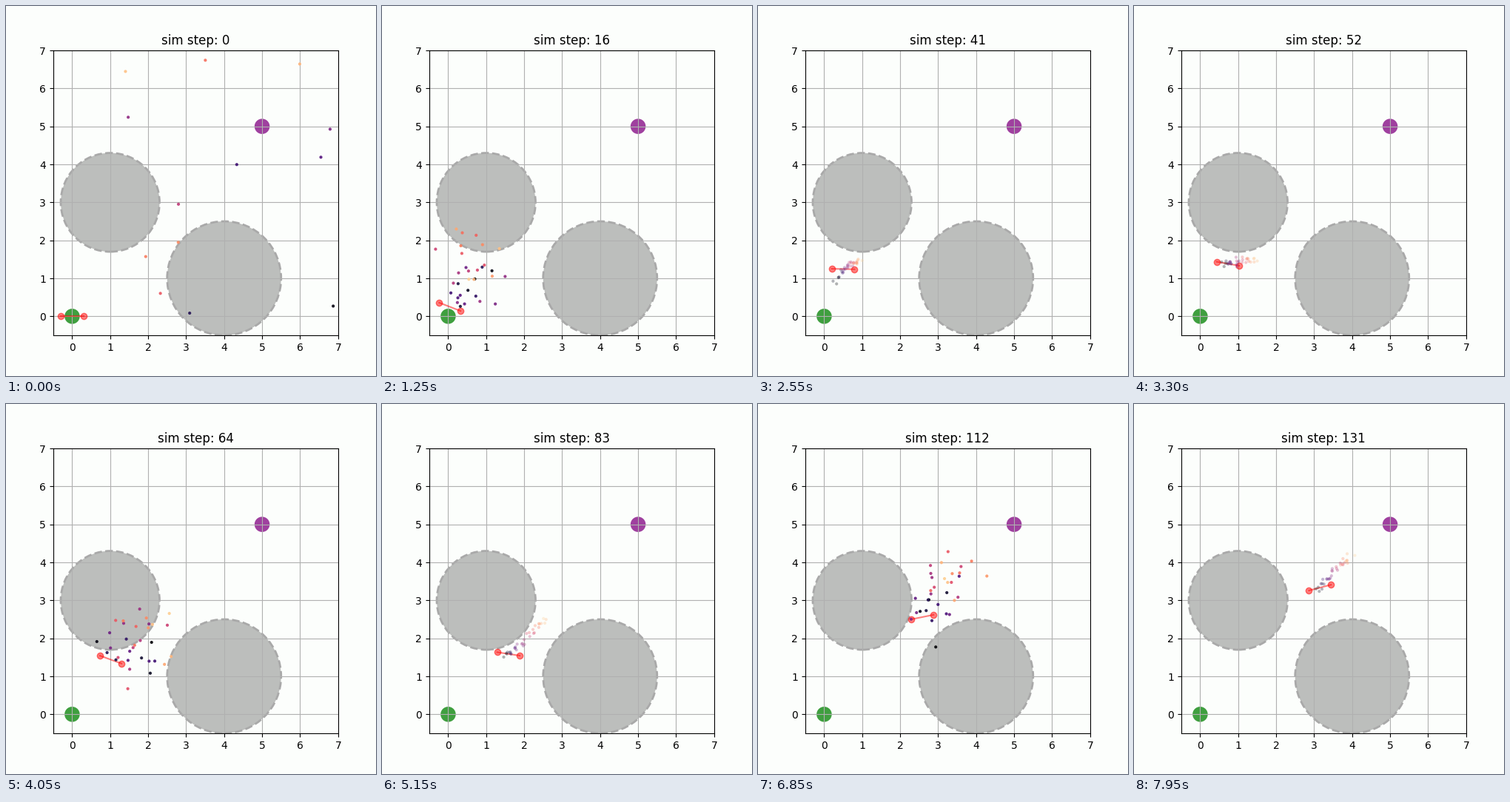
Recreate the animation shown at these times as a matplotlib script. Size 500x500 px, loop 8 s.

```python
import numpy as np
import matplotlib.pyplot as plt
from matplotlib.animation import FuncAnimation
from matplotlib.patches import Circle

FRAMES, INTERVAL = 160, 50
DENOISE, EXEC = 12, 16          # ticks spent planning / executing per cycle
HORIZON = 32
HALF = 0.3                      # half the robot's length
CENTRE, SPREAD = 3.25, 3.5      # distribution of the unplanned samples
BG = "#fcfefc"

# step, centre x, centre y, heading
KEYS = np.array([
    (0, 0, 0, 0), (16, .045, .25, -.37), (41, .5, 1.245, -.02),
    (64, 1.015, 1.44, -.35), (83, 1.585, 1.59, -.15),
    (112, 2.585, 2.56, .2), (131, 3.155, 3.335, .255), (160, 4.0, 4.2, .3),
])


def pose(step):
    """Cubic Hermite interpolation through the key poses."""
    ts, vals = KEYS[:, 0], KEYS[:, 1:]
    slopes = np.gradient(vals, ts, axis=0)
    s = np.atleast_1d(np.clip(step, ts[0], ts[-1])).astype(float)
    i = np.clip(np.searchsorted(ts, s, side="right") - 1, 0, len(ts) - 2)
    h = (ts[i + 1] - ts[i])[:, None]
    u = (s - ts[i])[:, None] / h
    return ((1 + 2 * u) * (1 - u) ** 2 * vals[i]
            + u * (1 - u) ** 2 * h * slopes[i]
            + u * u * (3 - 2 * u) * vals[i + 1]
            + u * u * (u - 1) * h * slopes[i + 1])


def samples(cycle, tick):
    """Noisy points that settle onto the path ahead while planning."""
    rng = np.random.default_rng(40 + cycle)
    plan = pose(cycle * EXEC + np.arange(HORIZON))[:, :2]
    plan = plan + rng.normal(0, .06, plan.shape)
    if tick >= DENOISE:
        return plan
    base = rng.normal(0, SPREAD, plan.shape)
    fresh = np.random.default_rng([cycle, tick]).normal(0, SPREAD, plan.shape)
    start = CENTRE + .9 * base + .4 * fresh
    return plan + (start - plan) * (1 - tick / DENOISE) ** 1.5


fig, ax = plt.subplots(figsize=(5, 5), dpi=100, facecolor=BG)
ax.set_facecolor(BG)
ax.set_aspect("equal")
ax.set_xlim(-.5, 7)
ax.set_ylim(-.5, 7)
ax.set_xticks(range(8))
ax.set_yticks(range(8))
ax.grid(True)

for centre, radius in (((1, 3), 1.3), ((4, 1), 1.5)):
    ax.add_patch(Circle(centre, radius, fc="#bcbebc", ec="#a9a9a9",
                        ls="--", lw=2))
for centre, color in (((0, 0), "green"), ((5, 5), "purple")):
    ax.add_patch(Circle(centre, .2, color=color, alpha=.75, lw=0))

robot, = ax.plot([], [], "ro-", alpha=.5)
dots = ax.scatter(np.zeros(HORIZON), np.zeros(HORIZON), s=9, linewidths=0,
                  c=plt.cm.magma(np.linspace(0, .9, HORIZON)), zorder=3)
title = ax.set_title("sim step: 0")


def update(frame):
    cycle, tick = divmod(frame * 3 // 2, DENOISE + EXEC)
    step = cycle * EXEC + max(0, tick - DENOISE + 1)
    x, y, a = pose(step)[0]
    dx, dy = HALF * np.cos(a), HALF * np.sin(a)
    robot.set_data([x - dx, x + dx], [y - dy, y + dy])
    dots.set_offsets(samples(cycle, tick))
    dots.set_alpha(.9 if tick < DENOISE else .3)
    title.set_text(f"sim step: {step}")
    return robot, dots, title


anim = FuncAnimation(fig, update, frames=FRAMES, interval=INTERVAL,
                     repeat=True, repeat_delay=0, blit=False)
plt.show()
```
